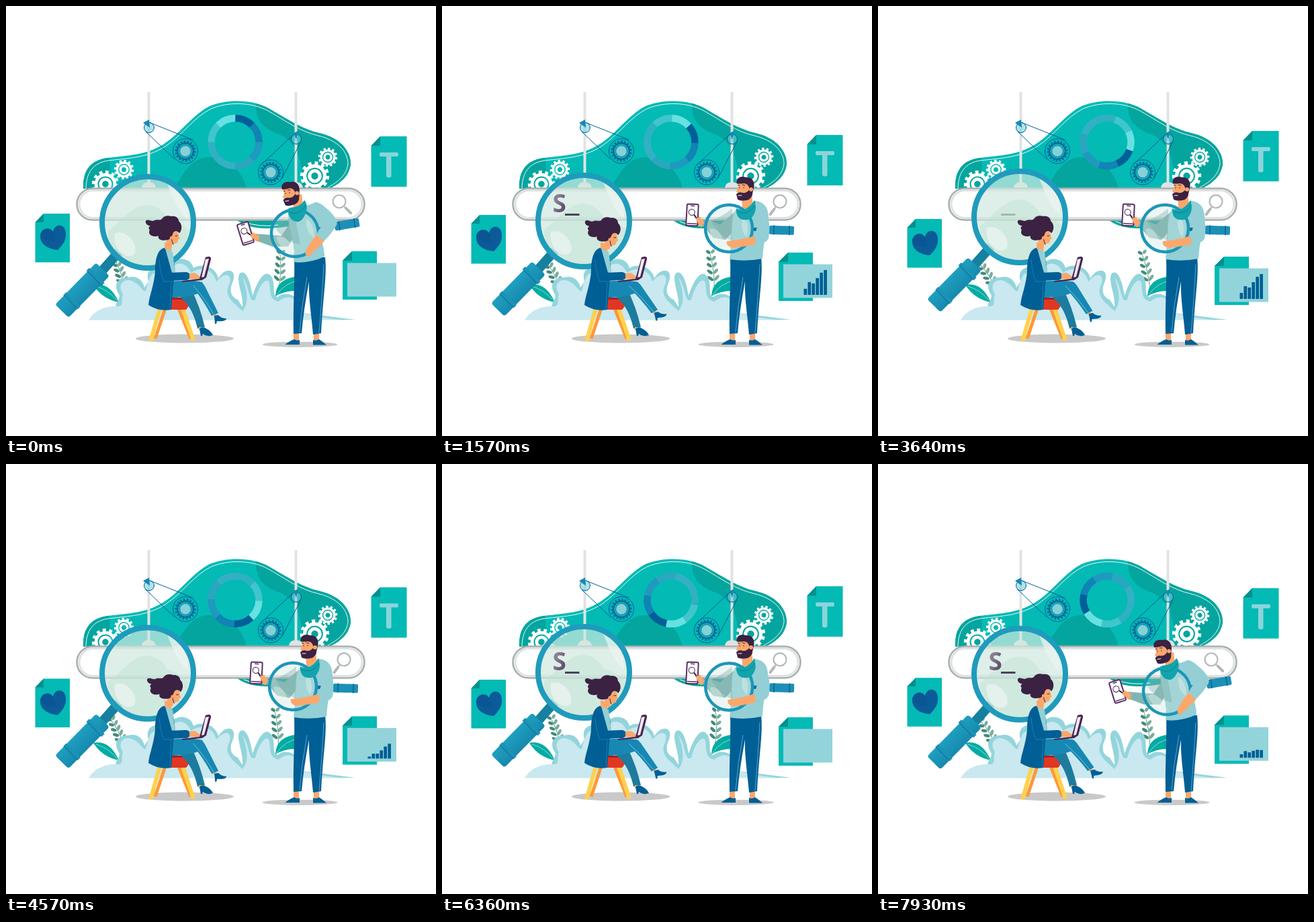
These frames come from a looping animation (640 px wide and 640 px high, 8 s). An HTML page:

```html
<!DOCTYPE html>
<html lang="en">
<head>
<meta charset="utf-8">
<title>Search illustration</title>
<style>
html, body { margin: 0; width: 100%; height: 100%; overflow: hidden; background: #fff; }
svg { display: block; width: 100%; height: 100%; }
.line { fill: none; stroke-linecap: round; stroke-linejoin: round; }
.navy { fill: #005f95; }
.skin { fill: #fba76c; }
.hair { fill: #3b2142; }
.shirt { fill: #93cfd5; }
</style>
</head>
<body>
<svg viewBox="0 0 640 640">
<defs>
  <clipPath id="cloudClip"><path id="cloud" d="M115 272C114 245 126 229 152 226C184 222 208 222 234 206C262 188 276 163 303 149C330 138 368 139 392 153C420 169 440 183 466 189C497 196 513 215 513 235C511 254 496 265 481 272Z"/></clipPath>
  <clipPath id="bigGlass"><circle cx="211" cy="322" r="64"/></clipPath>
  <clipPath id="smallGlass"><circle r="34"/></clipPath>
  <linearGradient id="letter" x2="1" y2="1"><stop offset=".35" stop-color="#8b8091"/><stop offset=".7" stop-color="#635270"/></linearGradient>
  <linearGradient id="tube" x2="1"><stop stop-color="#1f9fc0"/><stop offset="1" stop-color="#1689ae"/></linearGradient>
</defs>

<!-- cloud -->
<use href="#cloud" fill="#03bab5"/>
<g clip-path="url(#cloudClip)">
  <path fill="#03a59e" d="M110 280V222L152 222Q158 240 150 272ZM245 273C262 262 266 233 294 226C322 220 352 240 358 273ZM372 140C370 172 384 182 404 190C434 200 446 238 438 275H520V140Z"/>
  <path class="line" stroke="#fff" stroke-width=".9" d="M119 272C119 249 129 233 153 230C185 226 210 226 237 209C264 191 279 166 305 153C331 142 366 143 390 156C418 172 438 187 465 193C494 200 509 217 509 235C507 252 494 262 479 270"/>
</g>
<path fill="#03a59e" d="M344 319C360 331 385 334 420 328L430 318Z"/>
<path class="line" stroke="#fff" d="M354 321Q375 330 405 326"/>
<g id="donut" fill="none" stroke-width="10.5"></g>
<g id="gears"></g>

<!-- hanging search bar -->
<path stroke="#e1e3e3" stroke-width="4" d="M212.500 128V266M431.500 128V266"/>
<g class="line" stroke="#00609a">
  <g fill="#70cfd9" fill-opacity=".55"><circle cx="213" cy="181" r="7.500"/><circle cx="432" cy="198" r="7.500"/></g>
  <path d="M215 174L278 199M208 187L251 228M426 193L379 237M439 202L411 256"/>
</g>
<path fill="#1588b5" d="M204 174L213 169L214 181ZM428 189L435 186L432 199Z"/>
<path fill="#e1e3e3" d="M202 272Q202 262 212.500 262T223 272ZM421 272Q421 262 431.500 262T442 272Z"/>
<rect x="105.500" y="271.500" width="428" height="47" rx="23.500" fill="#fff" stroke="#a9afaf" stroke-width="2.600"/>
<rect x="109" y="274.500" width="421" height="41" rx="20.500" fill="none" stroke="#dfe2e2" stroke-width="3"/>
<g id="searchIcon" class="line" stroke="#b3b8b8"><circle cx="496" cy="291" r="9.500" stroke-width="2.200"/><path d="M503 298L506 301" stroke-width="2"/><path d="M506 301L513 308" stroke-width="4"/></g>

<!-- plants -->
<g id="sprigs"></g>
<path fill="#02aca3" d="M130 415Q154 410 168 441Q143 436 130 415ZM401 432Q402 404 438 402L442 425Q420 421 401 432Z"/>
<path class="line" stroke="#8bd9d5" d="M134 417Q153 423 165 438M403 430Q414 412 438 408"/>
<path fill="#93d5dc" d="M164 456C160 438 172 438 168 429C158 414 168 403 182 404C195 400 204 409 206 419L212 410C205 387 230 383 238 397C246 370 275 372 279 390C292 382 312 388 316 405C326 388 346 390 337 412C331 426 337 434 345 437L352 448C354 430 340 405 349 397C360 392 365 420 367 431C377 401 388 391 396 404C402 420 395 429 404 433C420 420 443 437 442 457L520 467H164Z"/>
<path fill="#c9e8ef" d="M123 467.500C131 453 148 446 165 447C177 447 170 438 174 429C163 412 180 401 194 413C200 416 204 426 208 424C212 410 214 397 226 396C236 395 236 407 240 407C243 378 268 377 275 397C292 386 309 393 313 410C330 391 338 403 331 417C325 433 338 441 352 454C365 438 355 414 352 404C363 417 361 444 371 437C378 411 389 403 392 412C394 428 392 436 405 440C425 425 436 438 436 455Q470 465 505 467.500Z"/>

<!-- documents -->
<g data-float="-1">
  <path fill="#03bab5" d="M557 194H596.500V269H543.500V208Z"/><path fill="#02908d" d="M557 194V208H543.500Z"/>
  <path fill="#8bd4dc" d="M557 218H583Q585 221 583 224H573.500V254Q570 257 566 254V224H557Q555 221 557 218Z"/>
</g>
<g data-float="1">
  <path fill="#03bab5" d="M56 309H95V381.500H43.500V322Z"/><path fill="#02908d" d="M56 309V322H43.500Z"/>
  <path fill="#0b5b99" d="M77 363C62 362 50 354 51 341C53 330 65 328 70 336C72 325 84 323 88 333C92 345 85 356 77 363Z"/>
  <path fill="#0a5593" d="M51 341C53 330 65 328 70 336L74 350Q60 352 51 341Z"/>
</g>
<g data-float="1">
  <path fill="#03bab5" d="M515 365H552V437H501V379Z"/><path fill="#02908d" d="M515 365V379H501Z"/>
  <rect x="508" y="382.500" width="73" height="50" fill="#93d4db"/>
  <g id="bars" class="navy"></g>
</g>

<!-- large magnifier -->
<g data-float="-1">
  <path stroke="#15809f" stroke-width="14" d="M168 366L144 393"/>
  <g transform="translate(144 392) rotate(44.500)">
    <rect x="-14" width="28" height="87" rx="4" fill="url(#tube)"/>
    <path stroke="#1b93b6" stroke-width="5" d="M-16 15H16M-15 65H15"/>
    <path stroke="#0f7095" d="M-16 18H16M-15 68H15"/>
  </g>
  <circle cx="211" cy="322" r="66" fill="#cfe8df" fill-opacity=".7"/>
  <g clip-path="url(#bigGlass)">
    <path fill="#bfe0d2" fill-opacity=".45" d="M152 335C166 325 177 310 188 304C213 285 236 304 240 316Q262 323 280 340L270 390H150Z"/>
    <path fill="#edf6f2" fill-opacity=".7" d="M162 338C181 332 198 356 191 369C179 380 158 361 162 338ZM239 262Q272 280 271 318Q258 312 239 262Z"/>
  </g>
  <circle cx="211" cy="322" r="68" fill="none" stroke="#1f9bbc" stroke-width="8"/>
</g>
<text id="typed" x="164.500" y="307" font-family="'Open Sans', sans-serif" font-weight="700" font-size="37" fill="url(#letter)">S</text>
<rect id="cursor" x="183" y="309" width="21.500" height="3" fill="#4d405c"/>

<!-- seated woman -->
<ellipse cx="266" cy="495" rx="73" ry="6.500" fill="#c9c9c9"/>
<path stroke="#ff9838" stroke-width="5" d="M237 450L222 495M257 450L275 495"/>
<path stroke="#ffd14e" stroke-width="6" d="M229 450L215 499M263 450L279 498"/>
<path fill="#df3724" d="M243 434H273Q274 447 268 452H246Z"/>
<path fill="#a91f26" d="M246 434H272V437H246Z"/>
<path fill="#1d7b9e" d="M252 420L276 422Q289 448 296 478L285 480Q278 449 262 436Z"/>
<path class="skin" d="M287 478H294V482H287Z"/>
<path class="navy" d="M288 481Q290 477 296 479Q306 484 308 490Q299 493 293 488L292 491H290Z"/>
<path fill="#1688b3" d="M247 410Q275 407 292 411Q299 421 286 428Q270 434 246 434Z"/>
<g id="shin">
  <path class="skin" d="M307 458L312 457L315 464H310Z"/>
  <path fill="#1688b3" d="M277 417Q288 404 296 417L316 457L306 461Q293 437 277 417Z"/>
  <path class="line" stroke="#8bcbe0" stroke-width=".8" d="M279 416Q297 437 309 459"/>
  <path class="navy" d="M310 461L316 460Q320 465 328 465Q328 470 314 469L313 473H311Z"/>
</g>
<path class="skin" d="M236 352L247 354L246 369L236 366Z"/>
<path class="navy" d="M235 360C225 363 222 378 222 394C221 414 213 432 212 445Q227 455 246 452L249 414Q253 396 250 379Q247 367 235 360Z"/>
<path fill="#93cfd5" d="M237 361L248 366L252 397L247 397Z"/>
<path class="line" stroke="#005f95" stroke-width="12" d="M233 374L239 403L268 402"/>
<path class="line" stroke="#2585b0" stroke-width=".8" d="M228 378Q230 400 235 410H272M246 412L244 450"/>
<path class="skin" d="M273 398L281 397L291 404L284 407L273 406Z"/>
<path fill="#4b2451" d="M297 374Q306 371 305 377L298 404L292 408L262 411V409L288 406Z"/>
<path fill="#f0e9f2" d="M297 377L302 376L295 403L291 404Z"/>
<g id="womanHead">
  <path class="skin" d="M241 339L253 333Q258 339 257 343L259 346L256 348Q257 354 248 354L246 360L237 358Z"/>
  <path class="hair" d="M241 348C233 350 225 348 227 342C218 345 210 340 214 333C211 331 213 328 215 327C210 327 207 323 208 320C212 316 216 322 221 319C225 317 229 320 232 317C234 313 240 311 246 313C253 312 257 316 257 320C263 325 262 334 258 338C254 333 249 335 248 340Q245 347 241 348Z"/>
  <path class="line" stroke="#3b2142" d="M246 344Q247 352 249 355M252 342H255"/>
  <circle cx="246" cy="345" r="2.200" class="skin"/>
</g>

<!-- standing man: d is the leaning pose, data-b the upright pose -->
<ellipse cx="437.500" cy="503.700" rx="56" ry="4" fill="#c9c9c9"/>
<path class="skin" d="M428 486H436V499H428ZM458 486H466V499H458Z"/>
<path class="navy" d="M416 503.500Q423 498 429 496Q433 499 437 497V504H416ZM457 497Q462 499 466 496Q472 500 477 504.500H457Z"/>
<path class="navy" d="M429 374H475C478 400 472 430 469 487L457 489C455 462 450 435 451 410C446 437 442 462 440 487L428 488C427 448 430 410 429 374Z"/>
<path class="line" stroke="#6bb4d6" stroke-width=".8" d="M448 404Q440 445 437 485M473 385Q470 440 466 486"/>
<path fill="#7fb5b2" d="M426 318L410 342L372 339L372 349L396 358L420 358L436 330Z" data-b="M436 306L414 325L392 317L388 327L404 345L422 348L438 330Z"/>
<path class="shirt lead" d="M420 303C440 300 450 296 462 292C485 298 480 320 470 340C470 355 474 362 474 373Q450 384 428 381C432 350 418 330 420 303Z" data-b="M437 303C445 300 455 298 466 290C484 292 487 305 486 325C480 345 478 362 477 376Q452 381 428 377C432 350 428 325 437 303Z"/>
<g id="phone">
  <path class="skin" d="M6 -1L13 4L19 10L14 18L7 10Z"/>
  <rect x="-8.500" y="-16" width="17" height="32" rx="2" fill="#fff" stroke="#5b2f63" stroke-width="2"/>
  <path stroke="#5b2f63" stroke-width="1.500" d="M-3 -13.500H3M-7 13H7"/>
  <g class="line" stroke="#3b2142"><circle cx="-1" cy="-4" r="4.500"/><path stroke-width="2" d="M3 0L7 5"/></g>
  <path class="skin" d="M5 5L12 2L15 8L9 12Z"/>
</g>
<g id="manGlass">
  <path stroke="#0d6f98" stroke-width="5" d="M36 0H62"/>
  <rect x="60" y="-6.500" width="37" height="13" rx="2" fill="#1c8fb7"/>
  <path stroke="#0b6691" stroke-width="1.500" d="M67 -7V7M90 -7V7"/>
  <circle r="35" fill="#c7e2da" fill-opacity=".3"/>
  <g clip-path="url(#smallGlass)">
    <path fill="#6b9f9c" fill-opacity=".32" d="M-27 -10Q-10 -18 4 -30L5 18Q-14 12 -27 -10Z"/>
    <path fill="#e5f3ee" fill-opacity=".4" d="M-29 2Q-14 -4 -4 28Q-22 29 -29 2ZM20 -18Q31 -10 27 12Q16 2 20 -18Z"/>
  </g>
  <circle r="35" fill="none" stroke="#1c96b8" stroke-width="4.500"/>
</g>
<path class="skin" d="M425 284L440 280L442 296Q436 304 428 300Z" data-b="M446 284L461 280L463 296Q455 304 447 300Z"/>
<path fill="#12a3ad" d="M420 302C424 298 436 302 444 289C452 296 446 317 436 321C424 322 419 311 420 302Z" data-b="M438 301C444 306 456 304 465 289C470 298 466 316 455 318C442 320 437 312 438 301Z"/>
<path class="line" stroke="#078692" d="M422 307Q436 313 446 297" data-b="M440 306Q455 313 466 297"/>
<g id="manHead">
  <path class="skin" d="M440 262L441 271L438 276L441 279V286L458 290L462 268L456 259Z"/>
  <path class="hair" d="M439 264C437 256 445 252 452 255C463 254 466 263 464 271L461 284L457 278V270Q455 264 449 264Q443 265 439 264Z"/>
  <path class="hair" d="M438 280Q442 276 447 278Q453 279 457 274L462 277Q462 287 454 289Q444 291 440 288Z"/>
  <path class="line" stroke="#fff" d="M441 282H446"/>
  <path class="line" stroke="#3b2142" d="M441 267H443M447 266L451 267M443 270V271M449 270V271"/>
  <circle cx="460" cy="273" r="3" class="skin"/>
</g>
<path class="skin lead" d="M463 339L474 350Q462 362 452 372Q444 374 446 364Q454 350 463 339Z" data-b="M466 342L467 355Q450 358 434 360Q422 358 424 350Q446 348 466 342Z"/>
<path class="shirt lead" d="M458 292C478 296 496 318 492 326Q484 340 473 350L462 340L470 326Z" data-b="M466 291C486 296 490 326 486 346Q482 354 467 355L465 342L470 326Z"/>
</svg>

<script>
const LOOP = 8000;
const byId = id => document.getElementById(id);
const place = (node, value) => node.setAttribute('transform', value);
const ease = (from, to, t) => {
  const u = Math.min(1, Math.max(0, (t - from) / (to - from)));
  return u * u * (3 - 2 * u);
};
const lerp = (a, b, p) => a + (b - a) * p;
const wave = (t, period) => Math.cos(2 * Math.PI * t / period);

function morph(a, b, p) {
  const ends = b.match(/-?[\d.]+/g);
  let i = 0;
  return a.replace(/-?[\d.]+/g, v => lerp(+v, +ends[i++], p).toFixed(2));
}

const ring = (r, color, width, extra = '') =>
  `<circle r="${r}" fill="none" stroke="${color}" stroke-width="${width}" ${extra}/>`;
const teeth = n => `pathLength="${2 * n}" stroke-dasharray="1 1"`;

const whiteGear = (x, y, s) => `<g transform="translate(${x} ${y}) scale(${s})"><g class="spin">
  ${ring(18.5, '#fff', 5, teeth(12))}${ring(14.5, '#fff', 5)}${ring(7.5, '#fff', 5)}</g></g>`;
const beltGear = (x, y) => `<g transform="translate(${x} ${y})">
  ${ring(18.5, '#00609a', 1)}<g class="spin">${ring(14, '#0a6b9c', 3.5, teeth(18))}
  ${ring(12, '#0a6b9c', 2.5)}</g><circle r="8.5" fill="#86d0d8" stroke="#1b91b3" stroke-width="1.5"/></g>`;

byId('gears').innerHTML =
  whiteGear(148, 265, .96) + whiteGear(175.5, 243.5, .7) +
  whiteGear(459.5, 253, 1.03) + whiteGear(479, 225, .68) +
  beltGear(267, 216) + beltGear(394, 247.5);

byId('donut').innerHTML =
  ['#005f98', '#1283b5', '#2099bf', '#2aa7bf', '#34b0c4', '#2eb1c0', '#40c5cc', '#67e0e1']
    .map((color, i) => ring(35.5, color, 10.5,
      `pathLength="360" stroke-dasharray="45.5 314.5" transform="rotate(${i * 45 - 90})"`)).join('');

const sprig = length => {
  let parts = `<path class="line" stroke="#5d9c8b" stroke-width=".9" d="M0 0Q5 ${-length / 2} 0 ${-length}"/>`;
  for (let i = 0; i < 5; i++) {
    const y = -length * (.26 + i * .17), size = 5.2 - i * .4;
    for (const side of [-1, 1])
      parts += `<ellipse cx="${side * (size + 1)}" rx="${size}" ry="2.3" fill="${side < 0 ? '#438b7b' : '#78ad9f'}"
        transform="translate(1.5 ${y}) rotate(${side * -42})"/>`;
  }
  return `<g>${parts}</g>`;
};
byId('sprigs').innerHTML = sprig(50) + sprig(60);

const barHeights = [9, 19, 17, 25, 33, 37];
byId('bars').innerHTML = barHeights.map((_, i) => `<rect x="${538.5 + i * 5.95}" width="4.7"/>`).join('');

const bars = [...byId('bars').children];
const [leftSprig, rightSprig] = byId('sprigs').children;
const spinners = document.querySelectorAll('.spin');
const floaters = document.querySelectorAll('[data-float]');
const limbs = [...document.querySelectorAll('[data-b]')].map(node => ({
  node, lean: node.getAttribute('d'), upright: node.dataset.b, leads: node.classList.contains('lead')
}));

// The glass and the arm holding it settle before the head and the phone.
function poseMan(t) {
  const rise = ease(.5, 1.5, t);
  const p = rise - ease(6.5, 7.5, t);
  const lead = rise - ease(6.2, 7.2, t);
  const arc = 4 * p * (1 - p);
  for (const { node, lean, upright, leads } of limbs)
    node.setAttribute('d', morph(lean, upright, leads ? lead : p));
  place(byId('manHead'), `translate(${lerp(-27, 0, p)} ${lerp(7, 0, p)}) rotate(${lerp(-9, 0, p)} 451 271)`);
  place(byId('phone'), `translate(${lerp(356.5, 372.5, p) + 14 * arc} ${lerp(338.5, 311, p) + 4 * arc}) rotate(${lerp(-17, 3, p)})`);
  place(byId('manGlass'), `translate(${lerp(430, 427, lead)} ${lerp(338, 331, lead)}) rotate(${lerp(-9.5, 2, lead)})`);
  place(byId('searchIcon'), `rotate(${82 * p} 499.5 295)`);
}

function draw(t) {
  const drift = 6 * (1 - wave(t, 12));
  for (const node of floaters) place(node, `translate(0 ${node.dataset.float * drift})`);
  place(byId('donut'), `translate(341 202.5) rotate(${30 * t})`);
  for (const node of spinners) place(node, `rotate(${30 * t})`);

  const sway = 8.5 * wave(t, 6);
  place(leftSprig, `translate(177 425) rotate(${sway - 26})`);
  place(rightSprig, `translate(405 425) rotate(${sway - 6})`);

  bars.forEach((bar, i) => {
    const lag = i * .022;
    const size = ease(.7 + lag, 1.3 + lag, t) - ease(4.2 + lag, 4.8 + lag, t) + ease(7.6 + lag, 8.2 + lag, t);
    bar.setAttribute('height', barHeights[i] * size);
    bar.setAttribute('y', 428 - barHeights[i] * size);
  });

  const typing = t % 5;
  byId('typed').setAttribute('opacity', ease(.4, 1, typing) - ease(3, 3.5, typing));
  byId('cursor').setAttribute('opacity', ease(.7, 1.3, typing) - ease(3.2, 3.9, typing));

  const nod = ease(.3, .9, t % 4) - ease(3.1, 3.6, t % 4);
  place(byId('womanHead'), `translate(${3 * nod} ${2 * nod}) rotate(${3 * nod} 240 358)`);
  place(byId('shin'), `rotate(${-5.5 * (1 - wave(t, 4.8))} 283 418)`);
  poseMan(t);
}

function frame() {
  draw(performance.now() % LOOP / 1000);
  requestAnimationFrame(frame);
}
frame();
</script>
</body>
</html>
```
